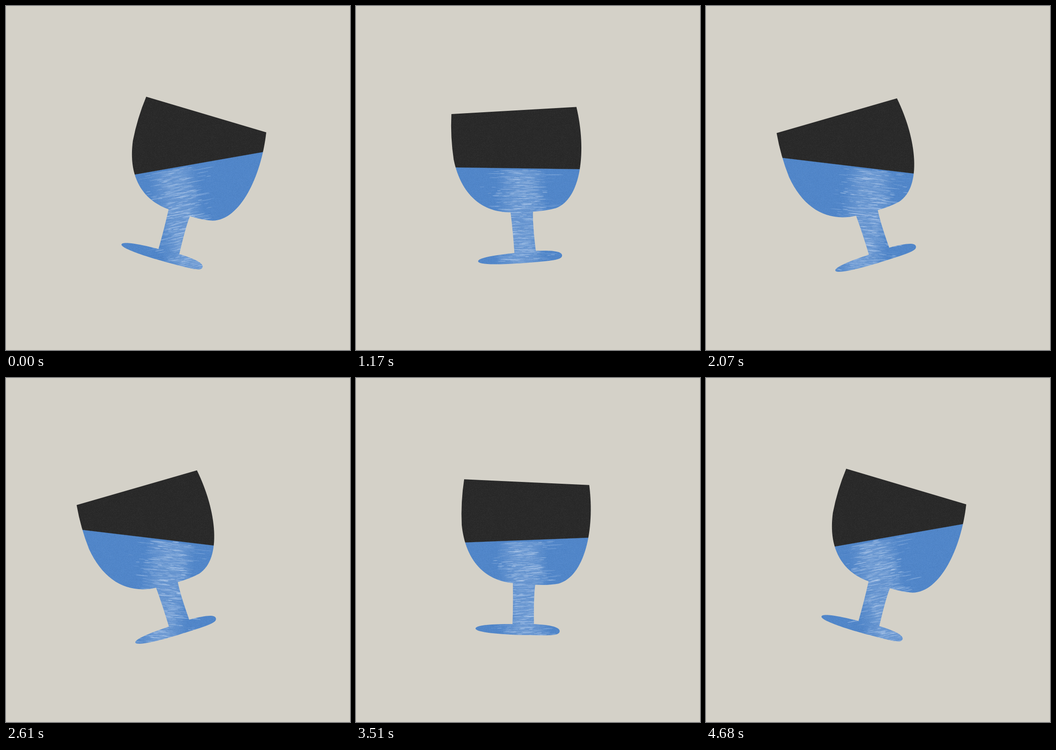
Write an HTML page with a canvas that moves like this. It is 748 px wide and 748 px high and loops after 4710 ms.

```html
<!DOCTYPE html>
<html lang="en">
<head>
<meta charset="utf-8">
<title>Swaying glass</title>
<style>
  html, body { margin: 0; width: 100%; height: 100%; overflow: hidden; background: #d4d1c8; }
  canvas { display: block; width: 748px; height: 748px; }
</style>
</head>
<body>
<canvas id="stage" width="748" height="748"></canvas>
<script>
const SIZE = 748, LOOP = 4710, STEP = 90;
const DEG = Math.PI / 180;
const PAPER = '#d4d1c8', DARK = '#282828', BLUE = '#5086ca';
const LIGHT = '#c6d9f2', SHADE = '#3f73ba';
const ctx = document.getElementById('stage').getContext('2d');

// The glass turns around PIVOT; its outline is described at REST_TILT.
const PIVOT = { x: 364, y: 495.5 }, REST_TILT = 2.5;
const RIGHT_TILT = 16.5, LEFT_TILT = -16.4;
const SURFACE = { x: 357, y: 353 };

const glass = new Path2D(`
  M234.5 220.5 L506.5 232.5
  C519.5 330 497 432 440 447 Q418 451 389.5 449.5
  Q386 475 387 535
  C425 537 443 542 443 550 C443 560 425 560 370 559
  C310 558 260 553 260 545 C260 537 300 535 340.5 535
  Q342 485 341 446
  C280 440 238 398 229.5 320 Q227 270 234.5 220.5 Z`);

// Cubic Bezier easing from (0,0) to (1,1) with flat ends.
function ease(x, x1 = 0.71, x2 = 0.21) {
  let low = 0, high = 1, s = 0.5;
  for (let i = 0; i < 24; i++) {
    const r = 1 - s;
    const reached = 3 * x1 * s * r * r + 3 * x2 * s * s * r + s * s * s;
    if (reached < x) low = s; else high = s;
    s = (low + high) / 2;
  }
  return s * s * (3 - 2 * s);
}

function makeRandom(seed) {
  return () => {
    seed = (seed * 1664525 + 1013904223) >>> 0;
    return seed / 4294967296;
  };
}

function makeGrain(size) {
  const tile = document.createElement('canvas');
  tile.width = tile.height = size;
  const pen = tile.getContext('2d');
  const random = makeRandom(5);
  for (let x = 0; x < size; x++) {
    for (let y = 0; y < size; y++) {
      const tone = random() < 0.5 ? 0 : 255;
      pen.fillStyle = `rgba(${tone}, ${tone}, ${tone}, ${random() * 0.04})`;
      pen.fillRect(x, y, 1, 1);
    }
  }
  return ctx.createPattern(tile, 'repeat');
}

function makeStreaks({ count, seed, spread, color, strength }) {
  const random = makeRandom(seed);
  return Array.from({ length: count }, () => ({
    x: 4 + (random() + random() + random() - 1.5) * spread,
    y: 2 + random() * 233,
    length: 4 + random() * random() * 22,
    weight: 0.4 + random() * 0.7,
    phase: random() * 2 * Math.PI,
    speed: 0.003 + random() * 0.005,
    alpha: strength * (0.4 + random() * 0.6),
    color
  }));
}

const grain = makeGrain(160);
const streaks = [
  ...makeStreaks({ count: 70, seed: 21, spread: 220, color: SHADE, strength: 0.14 }),
  ...makeStreaks({ count: 150, seed: 3, spread: 70, color: SHADE, strength: 0.3 }),
  ...makeStreaks({ count: 950, seed: 8, spread: 64, color: LIGHT, strength: 0.5 })
];

function glassTilt(time) {
  const half = LOOP / 2;
  const p = time < half ? ease(time / half) : 1 - ease(time / half - 1);
  return RIGHT_TILT + (LEFT_TILT - RIGHT_TILT) * p;
}

// The liquid leans against the glass, a little further to one side.
function surfaceTilt(tilt) {
  return -0.84 - 0.513 * tilt - 0.0024 * tilt * tilt;
}

function drawGlow() {
  const glow = ctx.createLinearGradient(-52, 0, 58, 0);
  glow.addColorStop(0, 'rgba(198, 217, 242, 0)');
  glow.addColorStop(0.35, 'rgba(198, 217, 242, 0.2)');
  glow.addColorStop(0.7, 'rgba(198, 217, 242, 0.2)');
  glow.addColorStop(1, 'rgba(198, 217, 242, 0)');
  ctx.fillStyle = glow;
  ctx.fillRect(-52, 4, 110, 230);
}

function drawStreaks(time) {
  for (const s of streaks) {
    const glow = Math.sin(time * s.speed + s.phase) * 0.6 + 0.4;
    if (glow <= 0) continue;
    ctx.globalAlpha = s.alpha * glow;
    ctx.fillStyle = s.color;
    ctx.beginPath();
    ctx.ellipse(s.x + 3 * glow, s.y, s.length, s.weight, -0.02, 0, 2 * Math.PI);
    ctx.fill();
  }
  ctx.globalAlpha = 1;
}

function draw(time) {
  const tilt = glassTilt(time);
  const level = surfaceTilt(tilt) * DEG;
  ctx.fillStyle = PAPER;
  ctx.fillRect(0, 0, SIZE, SIZE);

  const shape = new Path2D();
  shape.addPath(glass, new DOMMatrix()
    .translate(PIVOT.x, PIVOT.y).rotate(tilt - REST_TILT).translate(-PIVOT.x, -PIVOT.y));

  // A hard gradient stop separates the liquid from the dark part.
  const { x, y } = SURFACE;
  const dx = -200 * Math.sin(level), dy = 200 * Math.cos(level);
  const fill = ctx.createLinearGradient(x - dx, y - dy, x + dx, y + dy);
  fill.addColorStop(0.4985, DARK);
  fill.addColorStop(0.5015, BLUE);
  ctx.fillStyle = fill;
  ctx.fill(shape);

  ctx.save();
  ctx.clip(shape);
  ctx.translate(x, y);
  ctx.rotate(level);
  drawGlow();
  drawStreaks(time);
  ctx.restore();

  ctx.fillStyle = grain;
  ctx.fill(shape);
}

function tick() {
  const time = performance.now() % LOOP;
  draw(Math.floor(time / STEP) * STEP);
  requestAnimationFrame(tick);
}
tick();
</script>
</body>
</html>
```
